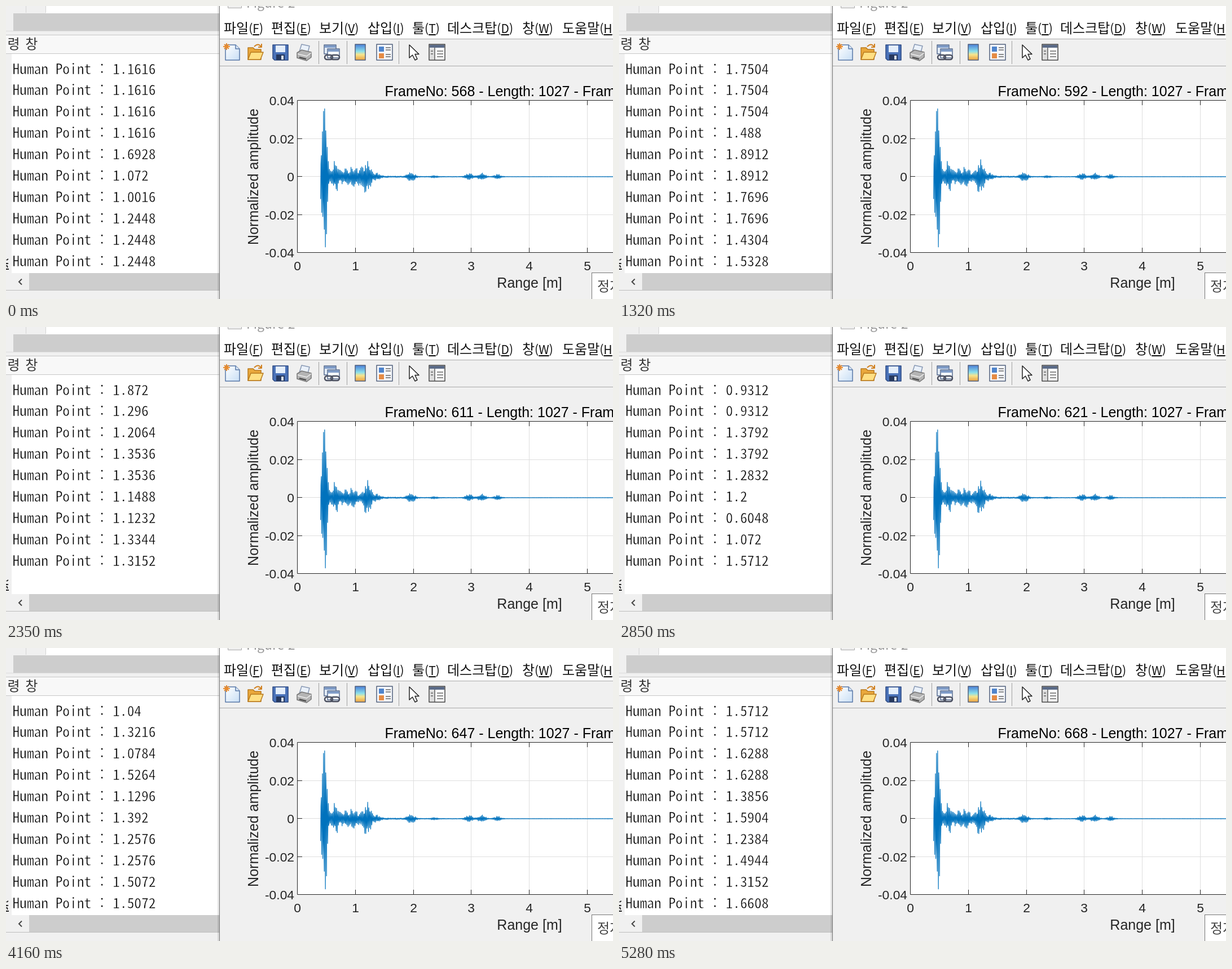
An HTML page that plays this animation: 1076 by 520 pixels, repeating every 5370 ms.

```html
<!DOCTYPE html>
<html lang="ko">
<head>
<meta charset="utf-8">
<style>
  html, body { margin: 0; width: 100%; height: 100%; overflow: hidden; background: #f0f0f0; }
  svg { display: block; }
  .ui { font: 24px "Noto Sans CJK KR", "Noto Sans KR", sans-serif; fill: #111; }
  .latin { font-size: 21px; }
  .key { text-decoration: underline; }
  .plot { font: 22.8px "Liberation Sans", Arial, sans-serif; fill: #262626; }
  .big { font-size: 25px; }
  /* the white outline thins the strokes */
  #log { font: 25.4px "Noto Sans Mono CJK KR", "Noto Sans Mono CJK JP", "Liberation Mono", monospace;
    fill: #000; stroke: #fff; stroke-width: .6px; }
</style>
</head>
<body>
<svg width="1076" height="520" viewBox="0 0 1076 520">
  <!-- command window -->
  <rect width="380" height="520" fill="#f0f0f0"/>
  <rect x="71" width="308" height="13" fill="#fff"/>
  <path d="M70.500 0V12M35.500 0V12" stroke="#d4d4d4"/>
  <rect x="13" y="13" width="366" height="31" fill="#cdcdcd"/>
  <path d="M0 44.500H378" stroke="#dcdcdc"/>
  <rect y="51" width="379" height="34" fill="#f8f8f8"/>
  <path d="M0 51.500H378M0 84.500H378" stroke="#c8c8c8"/>
  <text class="ui" x="2.500" y="76" style="fill:#333;word-spacing:3px">령 창</text>
  <rect x="10" y="85" width="369" height="389" fill="#fff"/>
  <rect x="41" y="474" width="338" height="30" fill="#cdcdcd"/>
  <path d="M28 484.500L23 489.500L28 494.500" fill="none" stroke="#444" stroke-width="2"/>
  <path d="M0 504.500H378" stroke="#bdbdbd"/>
  <path d="M4 449L1 451M0 457H4M1 460L3 464M0 467H5" stroke="#222" stroke-width="2"/>
  <g id="log"></g>

  <!-- figure window -->
  <rect x="375" width="3" height="520" fill="#000" opacity=".1"/>
  <rect x="378" width="698" height="520" fill="#f0f0f0"/>
  <rect x="378" width="698" height="58" fill="#fff"/>
  <path d="M378.500 0V520" stroke="#777"/>
  <path d="M379 58.500H1076M379 106.500H1076" stroke="#a8a8a8"/>
  <path d="M393.500 0V3.500H417.500V0" stroke="#aaa" fill="#eee"/>
  <text class="ui" x="426" y="3" style="fill:#999;font-size:23px">Figure 2</text>
  <g id="menu" class="ui"></g>
  <path d="M554.500 62V103M604.500 62V103M696.500 62V103" stroke="#a0a0a0"/>

  <!-- toolbar icons -->
  <defs>
    <linearGradient id="bar" x2="0" y2="1">
      <stop stop-color="#4a7fd8"/><stop offset=".45" stop-color="#8ce0ea"/>
      <stop offset=".65" stop-color="#f8e58c"/><stop offset="1" stop-color="#e8a040"/>
    </linearGradient>
    <linearGradient id="sheet" x2="1" y2="1"><stop stop-color="#fff"/><stop offset="1" stop-color="#c8def5"/></linearGradient>
  </defs>
  <g stroke-width="1.5" stroke-linejoin="round">
    <path d="M389 69H407L414 76V96H389Z" fill="url(#sheet)" stroke="#5878a8"/>
    <path d="M407 69V76H414" fill="#dbe8f7" stroke="#5878a8"/>
    <path d="M391 66V78M385 72H397M387 68L395 76M395 68L387 76" stroke="#e88a2c" stroke-width="2"/>

    <path d="M429 95V74H438L441 77H452V95Z" fill="#e9a83c" stroke="#b97a1e"/>
    <path d="M429 95L434 82H456L451 95Z" fill="#ffdf83" stroke="#b97a1e"/>
    <path d="M440 72Q447 65 452 72M453 67V73H447" fill="none" stroke="#d08020" stroke-width="2"/>

    <path d="M473 69H500V96H476L473 93Z" fill="#4a72b8" stroke="#2c4a84"/>
    <rect x="478" y="70" width="17" height="12" fill="#e4eefb"/>
    <rect x="479" y="86" width="15" height="10" fill="#26385e"/>
    <rect x="488" y="88" width="4" height="7" fill="#dde6f2"/>

    <path d="M520 81L524 68L538 71L535 82Z" fill="#eaf1fa" stroke="#8899b4"/>
    <path d="M516 83L524 78L541 82V91L533 97L516 92Z" fill="#b4b4b4" stroke="#777"/>
    <path d="M517 85L533 89L541 83" fill="none" stroke="#eee"/>
    <path d="M520 91L532 94" stroke="#444" stroke-width="2"/>

    <rect x="564" y="69" width="21" height="16" fill="#e4edf8" stroke="#566b8e"/>
    <rect x="565" y="70" width="19" height="4" fill="#7f9cc8"/>
    <rect x="570" y="76" width="21" height="16" fill="#f4f8fd" stroke="#566b8e"/>
    <rect x="571" y="77" width="19" height="4" fill="#7f9cc8"/>
    <rect x="565" y="87" width="14" height="8" rx="4" fill="none" stroke="#4a4f60" stroke-width="2.500"/>
    <rect x="576" y="87" width="15" height="8" rx="4" fill="none" stroke="#4a4f60" stroke-width="2.500"/>

    <rect x="619" y="68" width="18" height="28" fill="url(#bar)" stroke="#52607c"/>

    <rect x="657" y="68" width="28" height="28" fill="#f6f8fc" stroke="#52607c"/>
    <rect x="661" y="72" width="9" height="9" fill="#4f84cc"/>
    <rect x="661" y="84" width="9" height="9" fill="#e58b45"/>
    <path d="M673 74H682M673 78H682M673 86H682M673 90H682" stroke="#666"/>

    <path d="M715 69V92L720.500 87L725 96L729 94L725 85.500H732Z" fill="#fff" stroke="#222"/>

    <rect x="750" y="68" width="28" height="28" fill="#fff" stroke="#444"/>
    <rect x="751" y="69" width="26" height="5" fill="#5b6b88"/>
    <rect x="751" y="75" width="8" height="20" fill="#ddd"/>
    <path d="M760 74V96" stroke="#555"/>
    <path d="M764 80H775M764 85H775M764 90H775M753 80H757M753 85H757" stroke="#666"/>
  </g>

  <!-- chart -->
  <rect x="516" y="167" width="560" height="271" fill="#fff"/>
  <path id="grid" stroke="#dedede"/>
  <path id="wave" fill="none" stroke="#0072bd" stroke-width="1.200" stroke-linejoin="round"/>
  <path id="ticks" fill="none" stroke="#262626"/>
  <g id="labels" class="plot"></g>
  <text class="plot big" x="928" y="500" text-anchor="middle">Range [m]</text>
  <text class="plot big" transform="translate(447 303) rotate(-90)" text-anchor="middle">Normalized amplitude</text>
  <text id="title" class="plot big" x="671.500" y="160" style="fill:#000"></text>

  <rect x="1038.500" y="473.500" width="60" height="60" fill="#fff" stroke="#767676"/>
  <text class="ui" x="1048" y="506" style="fill:#444">정지</text>
</svg>
<script>
const $ = id => document.getElementById(id);
const random = n => Math.abs(Math.sin(n * 12.9898) * 43758.5453) % 1;
const bell = (x, centre, width) => Math.exp(-(((x - centre) / width) ** 2) / 2);

function addText(parent, x, y, text, anchor = 'start') {
  const el = document.createElementNS('http://www.w3.org/2000/svg', 'text');
  el.setAttribute('x', x);
  el.setAttribute('y', y);
  el.setAttribute('text-anchor', anchor);
  el.textContent = text;
  return parent.appendChild(el);
}

// Menu with underlined access keys
[[386, '파일', 'F'], [470, '편집', 'E'], [555, '보기', 'V'], [641, '삽입', 'I'], [720, '툴', 'T'],
 [782, '데스크탑', 'D'], [915, '창', 'W'], [986, '도움말', 'H']].forEach(([x, name, key]) => {
  addText($('menu'), x, 48, '').innerHTML =
    `${name}<tspan class="latin">(<tspan class="key">${key}</tspan>)</tspan>`;
});

// Axes
const px = metres => 516.5 + 102.8 * metres;
const py = level => 302.5 - 3375 * level;
let grid = '', ticks = 'M1076 167.5H516.5V437.5H1076';
for (let m = 0; m < 6; m++) {
  const x = Math.floor(px(m)) + .5;
  if (m) {
    grid += `M${x} 168V437`;
    ticks += `M${x} 168v8M${x} 437v-8`;
  }
  addText($('labels'), x, 469, m, 'middle');
}
for (let i = -2; i <= 2; i++) {
  const y = Math.floor(py(i / 50)) + .5;
  if (Math.abs(i) < 2) {
    grid += `M517 ${y}H1076`;
    ticks += `M516 ${y}h9`;
  }
  addText($('labels'), 511, y + 8.5, i / 50, 'end');
}
$('grid').setAttribute('d', grid);
$('ticks').setAttribute('d', ticks);

// Steps last about 101 ms; the final one holds to the end of the loop
const LOOP = 5370;
const stepAt = t => Math.min(52, Math.floor((t + 14) / 101.4));

// Key points: step, counter, nearness of the moving target
const keys = [[0, 568, 0], [19, 603, 1], [34, 633.6, .3], [52, 668, .7]];
function stateAt(step) {
  const i = Math.max(1, keys.findIndex(key => key[0] >= step));
  const [a, b] = [keys[i - 1], keys[i]];
  const f = (step - a[0]) / (b[0] - a[0]);
  return a.map((v, k) => v + f * (b[k] - v));
}

// Console: the opening readings, then seeded ones on the sensor's 0.0064 m raster
const FIRST = 559, PACKETS = 598;
const readings = [1.1616, 1.1616, 1.1616, 1.1616, 1.6928, 1.072, 1.0016, 1.2448, 1.2448, 1.2448];
while (readings.length < 110) {
  const n = readings.length;
  const bin = Math.floor(70 + 125 * (random(n) + random(n + 500)));
  readings.push(random(n + 900) < .3 ? readings[n - 1] : +(.0064 * (bin + .5)).toFixed(4));
}
const lineText = n => n === PACKETS ? 'Packets available: 102' : 'Human Point : ' + readings[n - FIRST];
const rows = Array.from({ length: 10 }, (_, i) => addText($('log'), 11.5, 120.5 + 37.89 * i, 'Human Point :'));
// Pick the size that gives the console's 12.7 px character cell
$('log').style.fontSize = 25.4 * 12.7 * 13 / rows[0].getComputedTextLength() + 'px';

// The bottom row stays empty while the console waits on a fresh line
const waiting = step => step > 16 && step < 36;

// A carrier under a sharp direct pulse and a row of echoes: [range, height]
const echoes = [[.66, 25], [.82, 13], [.96, 15], [1.36, 6], [1.96, 9], [2.36, 2], [2.96, 7], [3.18, 8], [3.45, 5]];

function wavePath(near) {
  const bumps = [...echoes, [1.1, 14 * (1 - near)], [1.21, 26 + 6 * near]];
  const points = [];
  for (let r = .4; r < 5.5; r += .0064) {
    const pulse = 134 * bell(r, .478, r < .478 ? .05 : .03);
    const echo = bumps.reduce((sum, [c, h]) => sum + h * bell(r, c, .052), .3 + 5 * Math.exp((.5 - r) / .8));
    const rough = r < .5 ? 0 : .5 + .55 * random(points.length);
    const wave = Math.cos(2 * Math.PI * (r - .4718) / .0206);
    points.push(px(r).toFixed(2) + ' ' + (303 - (pulse + rough * echo) * wave).toFixed(2));
  }
  return 'M' + points.join('L');
}

let shown = -1;
function draw(time) {
  const step = stepAt(time % LOOP);
  if (step === shown) return;
  shown = step;
  const [, counter, near] = stateAt(step);
  const n = Math.round(counter);
  const count = waiting(step) ? 9 : 10;
  rows.forEach((row, i) => row.textContent = i < count ? lineText(n - count + 1 + i) : '');
  $('title').textContent = `FrameNo: ${n} - Length: 1027 - Frame`;
  $('wave').setAttribute('d', wavePath(near));
}
const start = performance.now();
function tick() {
  draw(performance.now() - start);
  requestAnimationFrame(tick);
}
tick();
</script>
</body>
</html>
```
